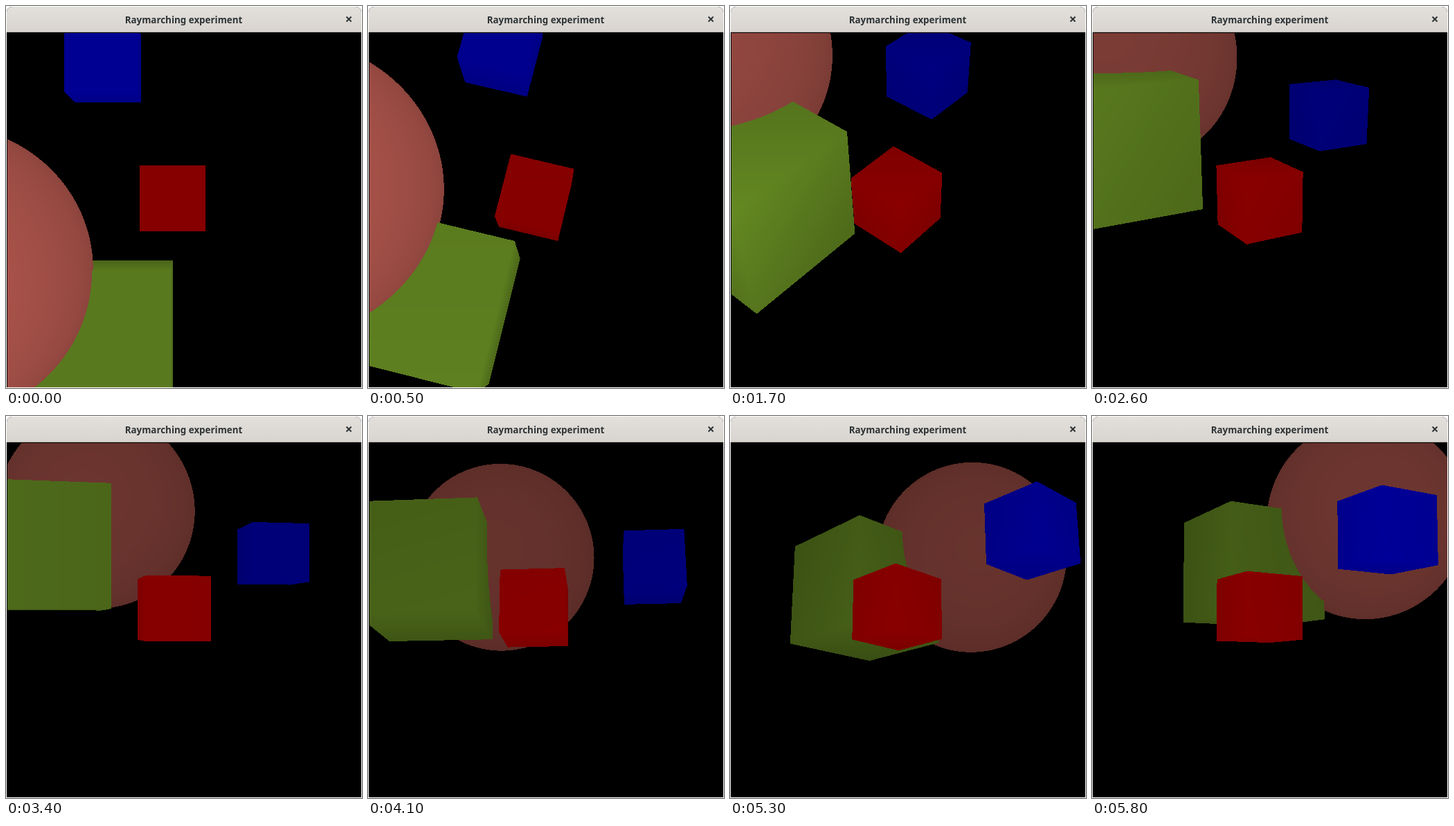
An HTML page with a canvas for the animation above (5.9 s loop, 514 by 551 pixels).

```html
<!DOCTYPE html>
<html lang="en">
<head>
<meta charset="utf-8">
<title>Raymarching experiment</title>
<style>
html, body { margin: 0; width: 100%; height: 100%; overflow: hidden; background: #fff; }
#win { position: absolute; left: 1px; top: 1px; width: 512px; height: 549px; background: #000; border-radius: 8px 8px 0 0; overflow: hidden; }
#bar { position: absolute; left: 0; top: 0; width: 512px; height: 36px; background: linear-gradient(#e3e0dc, #d8d4cf); border-bottom: 1px solid #b8b2aa; }
#bar svg { display: block; }
text { font: 700 13.4px "Noto Sans", "Open Sans", sans-serif; fill: #2e3436; text-anchor: middle; }
canvas { position: absolute; left: 1px; top: 38px; }
</style>
</head>
<body>
<div id="win">
  <div id="bar">
    <svg width="512" height="36">
      <text x="255.5" y="24">Raymarching experiment</text>
      <path d="M490.5 14.5l7 7m0-7l-7 7" stroke="#2e3436" stroke-width="2"/>
    </svg>
  </div>
  <canvas id="view" width="511" height="511"></canvas>
</div>
<script>
const SIZE = 511, LOOP = 5900, STEP = 100;
const FOCAL = 1031, DIST = 11.3, SHIFT = -0.183, UNIT = 0.977;
const ctx = document.getElementById('view').getContext('2d');
const img = ctx.createImageData(SIZE, SIZE);
const buf = new Uint32Array(img.data.buffer);

// Seconds, roll and pitch in degrees
const path = [
  [0, 0, 0], [0.9, 24.5, 19], [1.2, 32, 33], [1.7, 40, 45], [2.6, 60, 70.5], [3.4, 79, 90],
  [3.7, 88, 97], [3.8, 88, 97], [4.4, 101, 113.5], [5, 128.5, 114], [5.8, 149, 95]
];

const box = (x, y, z, h, color) => ({ x: x * UNIT, y: y * UNIT, z: z * UNIT, h, color });
const boxes = [
  box(0, 0, 0, 0.497, [255, 0, 0]),
  box(-1, -2, -1, 0.5, [0, 0, 255]),
  box(-1, 2, -1, UNIT, [147, 200, 50])
];
const ball = { x: -3 * UNIT, y: UNIT, z: -2 * UNIT, r: 1.9, color: [230, 113, 101] };

function pose(s) {
  let i = 1;
  while (i < path.length - 1 && path[i][0] < s) i++;
  const p = path[i - 1], q = path[i], k = (s - p[0]) / (q[0] - p[0]);
  return [1, 2].map(n => (p[n] + (q[n] - p[n]) * k) * Math.PI / 180);
}

function draw(s) {
  const [roll, pitch] = pose(s);
  const ca = Math.cos(roll), sa = Math.sin(roll), cb = Math.cos(pitch), sb = Math.sin(pitch);
  // Camera space to scene space
  const turn = (x, y, z) => {
    const v = cb * y - sb * z;
    return [ca * x + sa * v, ca * v - sa * x, sb * y + cb * z];
  };
  const [ox, oy, oz] = turn(-SHIFT, -SHIFT, -DIST);
  const bx = ox - ball.x, by = oy - ball.y, bz = oz - ball.z;
  const bc = bx * bx + by * by + bz * bz - ball.r * ball.r;

  for (let py = 0, n = 0; py < SIZE; py++) {
    for (let px = 0; px < SIZE; px++, n++) {
      const x = (px - 255.5) / FOCAL, y = (py - 255.5) / FOCAL;
      const v = cb * y - sb;
      const dx = ca * x + sa * v || 1e-9, dy = ca * v - sa * x || 1e-9, dz = sb * y + cb || 1e-9;
      let depth = 99, hit = null;

      for (const b of boxes) {
        const mx = (b.x - ox) / dx, my = (b.y - oy) / dy, mz = (b.z - oz) / dz;
        const hx = Math.abs(b.h / dx), hy = Math.abs(b.h / dy), hz = Math.abs(b.h / dz);
        const near = Math.max(mx - hx, my - hy, mz - hz);
        if (near < depth && near < Math.min(mx + hx, my + hy, mz + hz)) {
          depth = near;
          hit = b;
        }
      }

      const a = dx * dx + dy * dy + dz * dz, h = bx * dx + by * dy + bz * dz;
      const disc = h * h - a * bc;
      if (disc > 0) {
        const near = (-h - Math.sqrt(disc)) / a;
        if (near < depth) {
          depth = near;
          hit = ball;
        }
      }

      let pixel = 0xff000000;
      if (hit) {
        const light = 5.7 / depth, c = hit.color;
        pixel |= c[0] * light | (c[1] * light) << 8 | (c[2] * light) << 16;
      }
      buf[n] = pixel;
    }
  }
  ctx.putImageData(img, 0, 0);
}

let last = -1;
function tick() {
  const step = Math.floor(performance.now() % LOOP / STEP);
  if (step !== last) draw((last = step) * STEP / 1000);
  requestAnimationFrame(tick);
}
tick();
</script>
</body>
</html>
```
